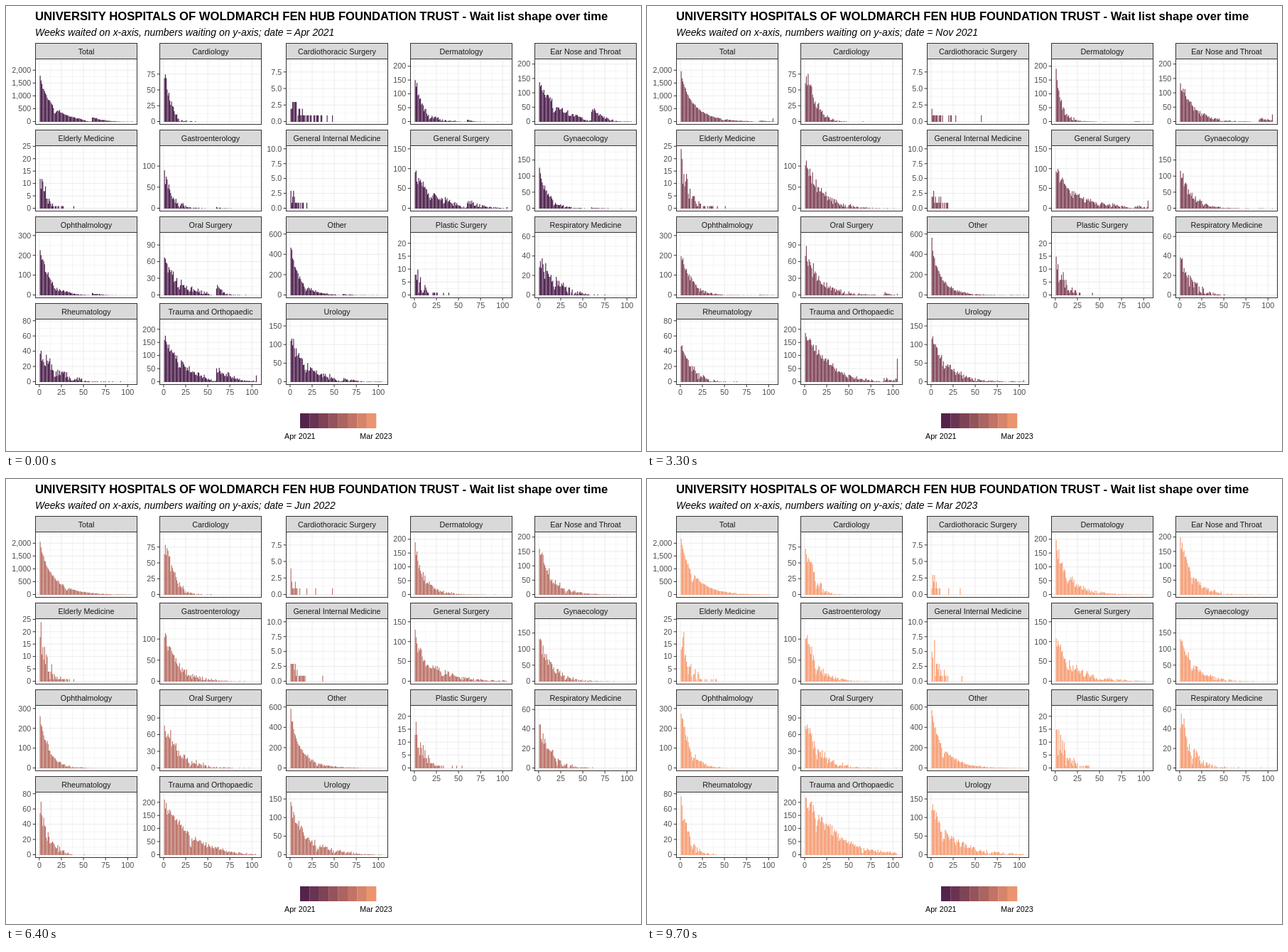
Animation of 894x626 px, one loop 10000 ms. Source, as an HTML page:

```html
<!DOCTYPE html>
<html lang="en">
<head>
<meta charset="utf-8">
<title>Wait list shape over time</title>
<style>
html, body { margin: 0; width: 100%; height: 100%; overflow: hidden; background: #fff; }
svg { display: block; width: 894px; height: 626px; font: 10.75px "Liberation Sans", Arial, sans-serif; }
.title { font-size: 16.67px; font-weight: bold; }
.sub { font-size: 13.93px; font-style: italic; }
.mid { text-anchor: middle; }
.end { text-anchor: end; }
.axis { fill: #4d4d4d; }
.strip { fill: #d9d9d9; stroke: #333; }
.strip-text { fill: #1a1a1a; }
.frame { fill: none; stroke: #333; }
.tick { stroke: #333; }
.major { stroke: #ebebeb; }
.minor { stroke: #ebebeb; stroke-width: .5; }
</style>
</head>
<body>
<svg id="chart" viewBox="0 0 894 626">
  <text class="title" x="41" y="20">UNIVERSITY HOSPITALS OF WOLDMARCH FEN HUB FOUNDATION TRUST - Wait list shape over time</text>
  <text class="sub" id="sub" x="41" y="42"></text>
</svg>
<script>
const LOOP = 10000, LAST = 23, MID = 6;   // months; curves are set at 0, MID and LAST
const MONTH = 4.35, WEEK = 1.2435;        // weeks per month, pixels per week
const W = 143, STRIP = 22, H = 92;
const COLS = [41.5, 216.5, 394.5, 569.5, 744.5];
const NAMES = 'Jan Feb Mar Apr May Jun Jul Aug Sep Oct Nov Dec'.split(' ');
const chart = document.getElementById('chart');
const sub = document.getElementById('sub');
const panels = [];

function add(tag, attrs, text) {
  const el = document.createElementNS('http://www.w3.org/2000/svg', tag);
  for (const k in attrs) el.setAttribute(k, attrs[k]);
  if (text !== undefined) el.textContent = text;
  return chart.appendChild(el);
}
const line = (cls, x1, y1, x2, y2) => add('line', { class: cls, x1, y1, x2, y2 });
const label = (cls, x, y, text) => add('text', { class: cls, x, y }, text);
const mix = (a, b, f) => a + (b - a) * f;
const clamp = (v, lo, hi) => Math.min(hi, Math.max(lo, v));
const shade = f => `rgb(${Math.round(mix(73, 247, f))},${Math.round(mix(27, 156, f))},${Math.round(mix(73, 114, f))})`;

function rand(a, b, c) {
  let h = Math.imul(a + 11, 374761393) ^ Math.imul(b + 977, 668265263) ^ Math.imul(c + 5, 1274126177);
  h = Math.imul(h ^ (h >>> 13), 1103515245);
  h = Math.imul(h ^ (h >>> 16), 2246822519);
  return ((h ^ (h >>> 15)) >>> 0) / 4294967296;
}

// peak and span: newest count and decay length in weeks, at the three set months.
// bend: 1 is a plain exponential. wave: height and length of the oldest backlog.
function panel(name, max, step, { peak, span, bend = 1, wave = [0, 1] }) {
  const i = panels.length, x = COLS[i % 5], top = 52.5 + 122 * Math.floor(i / 5);
  const y = top + STRIP, zx = x + 5.4, zy = y + H - 4, unit = H / 1.1 / max;
  const grid = [[], []];
  for (let k = 0; k * step / 2 <= max * 1.05; k++) grid[k % 2].push(k * step / 2);
  for (const m of [1, 0]) {
    const cls = m ? 'minor' : 'major';
    for (const v of grid[m]) line(cls, x, zy - v * unit, x + W, zy - v * unit);
    for (let k = m * 12.5; k < 110; k += 25) line(cls, zx + k * WEEK, y, zx + k * WEEK, y + H);
  }
  const paths = [add('path', {}), add('path', {})];
  add('rect', { class: 'frame', x, y, width: W, height: H });
  add('rect', { class: 'strip', x, y: top, width: W, height: STRIP });
  label('strip-text mid', x + W / 2, top + 15, name);
  for (const v of grid[0]) {
    line('tick', x - 3.8, zy - v * unit, x, zy - v * unit);
    label('axis end', x - 6.3, zy - v * unit + 3.8, step === 2.5 ? v.toFixed(1) : v.toLocaleString('en-US'));
  }
  if (i + 5 > 17) for (let k = 0; k <= 100; k += 25) {
    line('tick', zx + k * WEEK, y + H, zx + k * WEEK, y + H + 3.8);
    label('axis mid', zx + k * WEEK, y + H + 14.8, k);
  }
  panels.push({ i, max, peak, span, bend, wave, paths, zx, zy, unit });
}

const over = ([a, b, c], m) => m < MID ? mix(a, b, m / MID) : mix(b, c, (m - MID) / (LAST - MID));

// Fewer join the list around each New Year and during the closure a year before the start.
function intake(born) {
  const newYear = ((born + 17.5 + 26) % 52 + 52) % 52 - 26;
  const closure = clamp((born + 60) / 14, .25, 1);
  return closure * (1 - .45 * Math.exp(-((newYear / 1.6) ** 2)));
}

// The backlog from before the closure grows older and is worked off within a year.
function backlog(p, week, month) {
  const age = week - 59.5 - month * MONTH;
  const left = Math.max(0, 1 - month / 12) ** 1.5;
  return age < 0 ? 0 : p.wave[0] * left * Math.exp(-((age / p.wave[1]) ** 1.3));
}

function count(p, week, month) {
  if (week === 105) {
    let sum = 0;
    for (let w = 105; w < 170; w++) sum += backlog(p, w, month);
    return Math.round(sum);
  }
  const born = month * MONTH - week, id = Math.round(born) + 200;
  const fall = Math.exp(-(((week - 1) / over(p.span, month)) ** p.bend));
  const v = over(p.peak, month) * fall * intake(born) + backlog(p, week, month);
  const swing = rand(p.i, id, 1) + rand(p.i, id, 2) - 1;
  const n = v + Math.min(1.3 * v, 2.4 * Math.sqrt(v)) * swing + rand(p.i, id, 3);
  return clamp(Math.floor(n), 0, p.max);
}

// Odd and even weeks are separate shapes, so neighbouring edges blend like single bars.
function drawBars(p, month) {
  const d = ['', ''], base = Math.round(p.zy);
  for (let week = 1; week <= 105; week++) {
    const n = count(p, week, month), x = p.zx + (week - .45) * WEEK;
    if (n > 0) d[week % 2] += `M${x.toFixed(2)} ${base}v${(-n * p.unit).toFixed(2)}h${(.9 * WEEK).toFixed(2)}V${base}z`;
  }
  p.paths.forEach((path, k) => {
    path.setAttribute('d', d[k]);
    path.setAttribute('fill', shade(month / LAST));
  });
}

panel('Total', 2317, 500, { peak: [1800, 1900, 2200], span: [14, 14, 14], bend: .85, wave: [160, 14] });
panel('Cardiology', 94, 25, { peak: [72, 72, 75], span: [8, 13, 11], bend: 1.3 });
panel('Cardiothoracic Surgery', 9, 2.5, { peak: [2.4, .9, 2.5], span: [16, 10, 6] });
panel('Dermatology', 215, 50, { peak: [160, 190, 185], span: [8, 5, 13], bend: .85, wave: [5, 8] });
panel('Ear Nose and Throat', 207, 50, { peak: [130, 130, 190], span: [22, 15, 14], wave: [45, 12] });
panel('Elderly Medicine', 24, 5, { peak: [11, 19, 18], span: [8, 9, 8] });
panel('Gastroenterology', 141, 50, { peak: [82, 108, 120], span: [9, 18, 13], wave: [3, 8] });
panel('General Internal Medicine', 10, 2.5, { peak: [2.6, 2, 4.5], span: [9, 10, 9] });
panel('General Surgery', 150, 50, { peak: [95, 95, 118], span: [20, 22, 16], bend: .85, wave: [14, 17] });
panel('Gynaecology', 185, 50, { peak: [120, 115, 140], span: [10, 13, 15], wave: [2, 12] });
panel('Ophthalmology', 300, 100, { peak: [230, 215, 285], span: [11, 11, 10], wave: [9, 9] });
panel('Oral Surgery', 107, 30, { peak: [64, 74, 88], span: [17, 17, 15], wave: [18, 8] });
panel('Other', 585, 200, { peak: [490, 540, 570], span: [9, 9, 12], bend: .82, wave: [9, 12] });
panel('Plastic Surgery', 23, 5, { peak: [8, 13, 15], span: [7, 8, 10] });
panel('Respiratory Medicine', 61, 20, { peak: [32, 32, 52], span: [20, 13, 13], bend: 1.1 });
panel('Rheumatology', 78, 20, { peak: [38, 52, 70], span: [20, 12, 9], bend: 1.1 });
panel('Trauma and Orthopaedic', 227, 50, { peak: [155, 175, 210], span: [25, 27, 36], bend: 1.2, wave: [50, 19] });
panel('Urology', 160, 50, { peak: [112, 115, 135], span: [20, 17, 22], bend: .95, wave: [7, 13] });

for (let i = 0; i < 8; i++) {
  add('rect', { x: 414 + i * 13.4, y: 573, width: 13.5, height: 21, fill: shade((i + .5) / 8) });
}
label('mid', 413.8, 609, 'Apr 2021');
label('mid', 521, 609, 'Mar 2023');

// The first four months hold 500 ms, the others 400 ms; the date follows 100 ms later.
const monthAt = t => t < 2000 ? Math.max(0, Math.floor(t / 500)) : 4 + Math.floor((t - 2000) / 400);

let shown = -1, dated = -1;
function draw(t) {
  const month = monthAt(t), date = monthAt(t - 100);
  if (month !== shown) panels.forEach(p => drawBars(p, month));
  if (date !== dated) {
    const name = NAMES[(date + 3) % 12], year = 2021 + Math.floor((date + 3) / 12);
    sub.textContent = `Weeks waited on x-axis, numbers waiting on y-axis; date = ${name} ${year}`;
  }
  shown = month;
  dated = date;
}
const start = performance.now();
function tick() {
  draw((performance.now() - start) % LOOP);
  requestAnimationFrame(tick);
}
tick();
</script>
</body>
</html>
```
